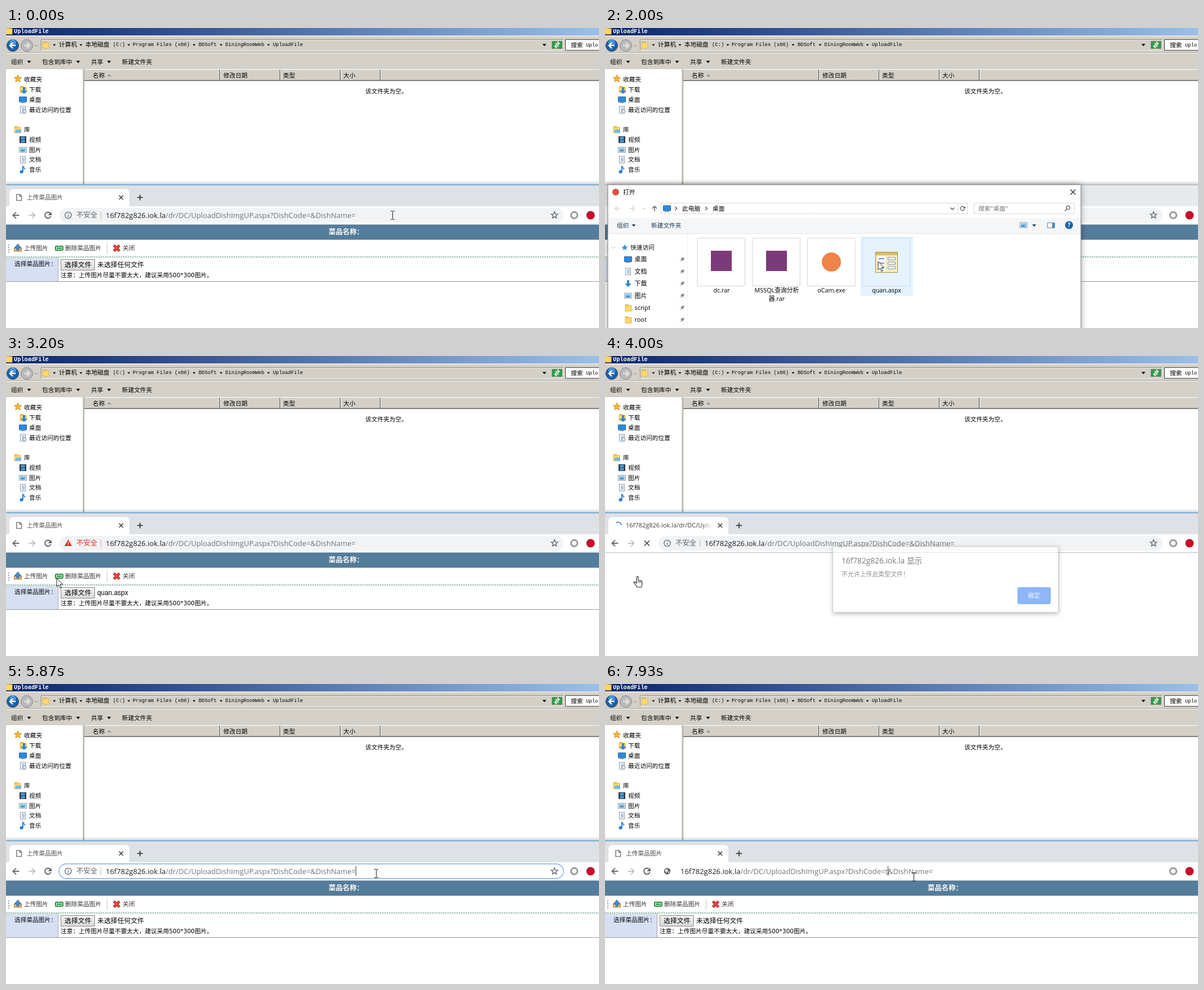
An HTML page with a canvas that plays this animation: 1053x532 px, repeating every 8000 ms.

```html
<!DOCTYPE html>
<html lang="zh-CN">
<head>
<meta charset="utf-8">
<title>上传菜品图片</title>
<style>
html, body { margin: 0; width: 100%; height: 100%; overflow: hidden; background: #fff; }
canvas { display: block; }
</style>
</head>
<body>
<canvas id="stage" width="1053" height="532"></canvas>
<script>
const ctx = document.getElementById('stage').getContext('2d');
const LOOP = 8000, W = 1053, H = 532;
const CJK = '"Noto Sans CJK SC", "Noto Sans CJK", sans-serif';
const UI = '"Open Sans", ' + CJK;
const MONO = '"Liberation Mono", monospace';
const HOST = '16f782g826.iok.la', PATH = '/dr/DC/UploadDishImgUP.aspx?DishCode=', TAIL = '&DishName=';
const GREY = '#5f6368';

// Drawing helpers
function paint(fill, stroke, lw = 1) {
  if (fill) { ctx.fillStyle = fill; ctx.fill(); }
  if (stroke) { ctx.strokeStyle = stroke; ctx.lineWidth = lw; ctx.stroke(); }
}
function box(x, y, w, h, fill, stroke, r = 0, lw = 1) {
  ctx.beginPath();
  ctx.roundRect(x, y, w, h, r);
  paint(fill, stroke, lw);
}
// White panel whose shadow falls only outside it, so it can fade cleanly
function panel(x, y, w, h, color, blur, drop = 0) {
  ctx.save();
  ctx.beginPath();
  ctx.rect(-W, -H, 3 * W, 3 * H);
  ctx.rect(x, y, w, h);
  ctx.clip('evenodd');
  ctx.shadowColor = color;
  ctx.shadowBlur = blur;
  ctx.shadowOffsetY = drop;
  box(x, y, w, h, '#fff');
  ctx.restore();
  box(x, y, w, h, '#fff');
}
function disc(x, y, r, fill, stroke, lw) {
  ctx.beginPath();
  ctx.arc(x, y, r, 0, 7);
  paint(fill, stroke, lw);
}
function shape(pts, fill, stroke, lw, close = true) {
  ctx.beginPath();
  for (let i = 0; i < pts.length; i += 2) ctx.lineTo(pts[i], pts[i + 1]);
  if (close) ctx.closePath();
  paint(fill, stroke, lw);
}
const line = (pts, color, lw = 1) => shape(pts, null, color, lw, false);
function text(s, x, cy, size = 10.7, color = '#000', font = CJK, weight = 400) {
  ctx.font = `${weight} ${size}px ${font}`;
  ctx.fillStyle = color;
  ctx.fillText(s, x, cy + size * 0.36);
  return x + ctx.measureText(s).width;
}
const down = (x, y, s = 3.5, color = '#000') => shape([x - s, y - s / 2, x + s, y - s / 2, x, y + s / 2 + .5], color);
function cross(x, y, s, color, lw) {
  line([x - s, y - s, x + s, y + s], color, lw);
  line([x + s, y - s, x - s, y + s], color, lw);
}
function arrow(x, y, s, dir, color, lw = 1.7) {
  line([x - dir * s, y, x + dir * s, y], color, lw);
  line([x, y - s, x + dir * s, y, x, y + s], color, lw);
}
function star(x, y, r, fill, stroke, lw) {
  const pts = [];
  for (let i = 0; i < 10; i++) {
    const a = i * Math.PI / 5 - Math.PI / 2, k = i % 2 ? r * .42 : r;
    pts.push(x + k * Math.cos(a), y + k * Math.sin(a));
  }
  shape(pts, fill, stroke, lw);
}
function reload(x, y, r, color, lw) {
  ctx.beginPath();
  ctx.arc(x, y, r, .3, 5.6);
  paint(null, color, lw);
  shape([x + r + 1, y - r, x + r + 1, y, x, y], color);
}

// Small icons, centred on x, y
const icons = {
  folder(x, y) { box(x - 5, y - 6, 6, 5, '#e6b93c'); box(x - 5, y - 4, 11, 10, '#fbd86b', '#e3b64a'); },
  screen(x, y) { box(x - 6.5, y - 5, 13, 9, '#2b8be0', '#2860a0'); box(x - 4, y + 5, 8, 1, '#777'); },
  page(x, y) {
    box(x - 4.5, y - 6, 9, 12, '#fff', '#7f95aa');
    for (let i = -3; i < 5; i += 2) line([x - 2, y + i, x + 3, y + i], '#6f9ac4');
  },
  photo(x, y) {
    box(x - 6.5, y - 4.5, 13, 9, '#fff', '#8496a8');
    box(x - 5, y - 3, 10, 6, '#7fc0ee');
    shape([x - 5, y + 3, x - 1, y, x + 5, y + 3], '#3b7fa8');
  },
  film(x, y) {
    box(x - 6, y - 6, 12, 12, '#263b52');
    box(x - 3.5, y - 5, 7, 10, '#4a9ad0');
    line([x - 4, y, x + 4, y], '#263b52');
  },
  note(x, y) {
    line([x, y + 4, x, y - 6, x + 4, y - 1], '#2b82d8', 2);
    disc(x - 2.5, y + 3.5, 3, '#2b82d8');
  },
  get(x, y) { shape([x - 2, y - 6, x + 2, y - 6, x + 2, y, x + 6, y, x, y + 6, x - 6, y, x - 2, y], '#2f86d2'); },
  saved(x, y) { icons.folder(x, y); icons.get(x + 2, y + 2); },
  recent(x, y) { icons.page(x, y); disc(x + 3, y + 3, 3, '#e8eef4', '#7890a8'); }
};

function explorer() {
  box(0, 0, W, 279, '#fff');
  box(0, 13, W, 60, '#d4d0c8');
  const bar = ctx.createLinearGradient(0, 0, W, 0);
  bar.addColorStop(0, '#0a246a');
  bar.addColorStop(1, '#9cbfea');
  box(0, 0, W, 13, bar);
  icons.folder(5, 5);
  text('UploadFile', 14, 5.5, 10.3, '#fff', MONO, 700);

  box(0, 14, W, 1, '#f4f2ee');
  disc(12, 31, 10.5, '#1c5fae', '#31475f');
  disc(12, 26, 6, '#4b93d6');
  arrow(12, 31, 5, -1, '#fff', 2.4);
  disc(37, 31, 10.5, '#b9b9b9', '#888');
  arrow(37, 31, 5, 1, '#e4e4e4', 2.4);
  line([51, 30, 53.5, 32.5, 56, 30], '#888');
  box(62.5, 20.5, 927, 19, null, '#8a867e');
  box(63.5, 21.5, 926, 18, null, '#eeece6');
  icons.folder(70, 30);
  for (const x of [86, 133, 218, 334, 382, 466]) down(x, 30, 2.5);
  text('计算机', 94, 29.5);
  text('本地磁盘', 141, 29.5);
  for (const [s, x] of [['(C:)', 190], ['Program Files (x86)', 225], ['BDSoft', 342], ['DiningRoomWeb', 389.5], ['UploadFile', 474]])
    text(s, x, 29, 8.9, '#000', MONO);
  down(956, 30);
  box(969.5, 23.5, 18, 13, '#2f9a46', '#71906f');
  arrow(979, 27.5, 3.5, 1, '#fff', 1.6);
  arrow(978, 32.5, 3.5, -1, '#fff', 1.6);
  box(993.5, 20.5, 70, 19, '#fff', '#45433f');
  text('搜索', 1003, 30);
  text('Uplo', 1030, 30, 8.9, '#000', MONO);
  box(0, 43, W, 1, '#a5a198');
  box(0, 44, W, 1, '#fff');

  for (const [s, x, tip] of [['组织', 9, 41], ['包含到库中', 64, 128], ['共享', 151, 183], ['新建文件夹', 206, 0]]) {
    text(s, x, 60);
    if (tip) down(tip, 60);
  }

  box(136, 73, 3, 206, '#d4d0c8');
  box(138, 73, 1, 206, '#a09c94');
  box(139, 74, W, 19, '#d4d0c8');
  box(139, 92.5, W, 1.2, '#47453f');
  for (const x of [380, 487, 594, 665]) { box(x - 1, 74, 1, 19, '#45433f'); box(x, 74, 1, 18, '#fff'); }
  for (const [s, x] of [['名称', 154], ['修改日期', 386], ['类型', 492], ['大小', 599]]) text(s, x, 84);
  shape([180, 85.5, 187, 85.5, 183.5, 82], '#888');
  text('该文件夹为空。', 638, 112);

  star(21, 90, 7, '#f7b731', '#d98b18');
  text('收藏夹', 32, 91);
  icons.folder(20, 180);
  box(17, 180, 10, 6, '#7db9e4');
  text('库', 32, 180);
  for (const [s, y, icon] of [['下载', 109, 'saved'], ['桌面', 127, 'screen'], ['最近访问的位置', 145, 'recent'],
    ['视频', 198, 'film'], ['图片', 216, 'photo'], ['文档', 233.5, 'page'], ['音乐', 251.5, 'note']]) {
    icons[icon](30, y);
    text(s, 41, y);
  }
}

function omnibox(t) {
  const focus = t >= 5840 && t < 7900, typed = t >= 7900;
  const red = t >= 1300 && t < 3400, selected = t >= 5930 && t < 6250;
  if (!typed) box(95, 319, 895, 26, focus ? '#fff' : '#f1f3f4', null, 13);
  if (focus) box(94, 319, 896, 26, null, '#9dbff5', 13, 1.8);
  const start = typed ? 134 : 177;
  if (typed) {
    disc(110.5, 332, 5.8, GREY);
    shape([106, 330, 110, 328, 112, 331, 109, 335], '#fff');
    shape([112, 333, 115, 332, 113, 336], '#fff');
  } else {
    if (red) {
      shape([110.5, 325.5, 117, 337, 104, 337], '#d93025');
      box(110, 329.5, 1.2, 4, '#fff');
      box(110, 334.5, 1.2, 1.2, '#fff');
    } else {
      disc(110.5, 332, 5.6, null, GREY, 1.3);
      box(110, 331, 1.3, 4, GREY);
      box(110, 328.5, 1.3, 1.3, GREY);
    }
    text('不安全', 125, 332, 12.4, red ? '#d93025' : GREY);
    box(168, 325, 1, 14, red ? '#e0a8a4' : '#b5b8bc');
    star(974, 332, 6.3, null, GREY, 1.3);
  }
  if (selected) box(177, 323, 446, 17, '#0078d7');
  const dark = selected ? '#fff' : '#202124', pale = selected ? '#fff' : '#70757a';
  const x = text(HOST, start, 332, 13, dark, UI);
  const caret = text(PATH + (typed ? 't' : ''), x, 332, 13, pale, UI);
  const end = text(TAIL, caret, 332, 13, pale, UI);
  const blink = (t >= 6250 && t < 6715) || (t >= 7190 && t < 7715) || typed;
  if (focus && t < 5930) box(end, 323, 1, 17, '#333');
  else if (blink) box(caret, 323, 1, 17, '#333');
}

function browser(t) {
  const inactive = t >= 1400 && t < 2500, loading = t >= 3400 && t < 4800;
  const glow = ctx.createLinearGradient(0, 271, 0, 278);
  glow.addColorStop(0, '#0000');
  glow.addColorStop(1, '#0003');
  box(0, 271, W, 7, glow);
  box(0, 278, W, H, '#fff');
  box(0, 277.5, W, 38.5, inactive ? '#e7eaed' : '#dee1e6');
  box(0, 277.5, W, 1.3, inactive ? '#a8abb0' : '#3f94d1');
  box(6, 285.5, 213, 36, '#fff', null, 7);
  box(0, 316, W, 33, '#fff');
  if (loading) {
    const a = (t - 4000) / 160;
    ctx.beginPath();
    ctx.arc(23, 300.5, 6, a - 2.2, a - .1);
    paint(null, '#5f86c8', 1.8);
    ctx.save();
    ctx.beginPath();
    ctx.rect(37, 290, 155, 22);
    ctx.clip();
    const fade = ctx.createLinearGradient(170, 0, 192, 0);
    fade.addColorStop(0, '#3c4043');
    fade.addColorStop(1, '#3c404300');
    text(HOST + '/dr/DC/UploadDish', 37, 300.5, 11, fade, UI);
    ctx.restore();
    cross(74.5, 332, 4.6, '#505357', 1.7);
  } else {
    shape([19, 295, 24.5, 295, 27.5, 298, 27.5, 306, 19, 306], '#fff', '#505357', 1.2);
    line([24, 295, 24, 298.5, 27.5, 298.5], '#505357');
    text('上传菜品图片', 37, 300.5, 10.7, '#45494d');
    reload(74.5, 332, 5.3, '#505357', 1.7);
  }
  cross(204.5, 300.5, 3.6, '#45494d', 1.5);
  line([233, 300.5, 243, 300.5], '#333', 1.7);
  line([238, 295.5, 238, 305.5], '#333', 1.7);
  arrow(18, 332, 5.5, -1, '#505357');
  arrow(46, 332, 5.5, 1, '#b8babd');
  omnibox(t);
  disc(1009, 332, 5.7, null, '#9a9a9a', 3);
  disc(1038, 332, 7.5, '#c70d2c');
  if (t >= 3640 && t < 4800) box(0, 348, W, 1, '#b9bbbe');
  else page(t);
}

function page(t) {
  box(0, 348.5, W, 27, '#547c9b');
  text('菜品名称：', 573, 362, 12.4, '#fff', CJK, 700);
  for (let y = 384; y < 398; y += 4) box(4, y, 2, 2, '#999');
  box(14.5, 390, 13, 6, '#e8b878', '#a37c4c');
  shape([21, 383, 27, 390, 23, 390, 23, 394, 19, 394, 19, 390, 15, 390], '#4a90c8', '#2f6797');
  text('上传图片', 32, 390.5, 10.7, '#333');
  box(88, 387, 13, 7, '#fff', '#268a3d', 1, 2);
  box(90, 389, 9, 3, '#2eaa4c');
  text('删除菜品图片', 105, 390.5, 10.7, '#333');
  box(179, 381, 1, 20, '#c8c8c8');
  cross(196.5, 390.5, 5, '#a8201a', 4.6);
  cross(196.5, 390.5, 5, '#e04a3f', 3);
  text('关闭', 207, 390.5, 10.7, '#333');
  for (let x = 0; x < W; x += 4) box(x, 405.5, 2.6, 1, '#2e7d46');

  box(0, 407, 92, 42, '#d7e0f3');
  box(92, 407, 1, 42, '#a0a4aa');
  box(0, 449, W, 1, '#999');
  text('选择菜品图片：', 15, 418);
  const face = ctx.createLinearGradient(0, 410, 0, 430);
  face.addColorStop(0, '#f2f2f2');
  face.addColorStop(1, '#d9d9d9');
  box(97.5, 410.5, 60, 19, face, '#8a8a8a');
  text('选择文件', 104, 420, 11.9);
  if (t >= 2480 && t < 3640) text('quan.aspx', 162, 420, 11.9, '#000', '"Liberation Sans", sans-serif');
  else text('未选择任何文件', 162, 420, 11.9);
  let x = text('注意：上传图片尽量不要太大，建议采用', 97, 438.5);
  x = text('500*300', x, 438.5, 10.6, '#000', '"DejaVu Sans", sans-serif');
  text('图片。', x, 438.5);
}

function fileDialog(t, alpha, scale, pos) {
  const closing = t >= 2520;
  ctx.save();
  ctx.translate(425, 500);
  ctx.scale(scale, scale);
  ctx.translate(-425, -500);
  ctx.globalAlpha = alpha ** 2;
  panel(5, 278, 840, 480, '#0006', 11);
  box(5.5, 337, 839, 27, '#f5f6f7');
  ctx.globalAlpha = alpha;
  box(5, 278, 840, 480, null, '#85888c');
  if (!closing) {
    disc(19, 291, 6, '#dd5144');
    cross(831, 291, 4.5, '#222', 1.2);
  }
  text('打开', closing ? 14 : 32, 291.5);

  arrow(22, 320, 4.5, -1, '#d0d0d0', 1.3);
  arrow(48, 320, 4.5, 1, '#d0d0d0', 1.3);
  line([67, 319, 69.5, 321.5, 72, 319], '#bbb');
  line([88, 325, 88, 316], '#555', 1.4);
  line([84, 320, 88, 316, 92, 320], '#555', 1.4);
  box(99.5, 310.5, 544, 19, null, '#d9d9d9');
  box(626, 311, 1, 18, '#d9d9d9');
  icons.screen(110, 320);
  for (const x of [126, 180]) line([x - 1.5, 317, x + 1.5, 320, x - 1.5, 323], '#444', 1.2);
  text('此电脑', 137, 320);
  text('桌面', 191, 320);
  line([613.5, 318.5, 617, 322, 620.5, 318.5], '#555', 1.3);
  reload(635, 320, 3.7, '#555', 1.2);
  box(655.5, 310.5, 178, 19, null, '#d9d9d9');
  text('搜索"桌面"', 663, 320, 10.7, '#757575');
  disc(822.5, 318.5, 3.2, null, '#555', 1.2);
  line([820, 321, 816.5, 324.5], '#555', 1.5);

  text('组织', 21, 350.5, 10.7, '#1e395b');
  down(51, 350, 3.5, '#1e395b');
  text('新建文件夹', 82, 350.5, 10.7, '#1e395b');
  icons.photo(743, 349.5);
  down(762, 350, 3.5, '#1e395b');
  box(785.5, 345.5, 13, 9, '#fff', '#5d83a8');
  box(794, 346, 4, 8, '#4a8cc8');
  disc(824, 349.5, 7, '#0f62ad');
  text('?', 821.5, 349.5, 10, '#fff', UI, 700);
  box(6, 364, 838, 1, '#e3e5e8');

  line([12, 388, 15, 391, 18, 388], '#bbb');
  star(35, 389.5, 6, '#2f8fd8');
  text('快速访问', 45, 389.5);
  [['桌面', 'screen'], ['文档', 'page'], ['下载', 'get'], ['图片', 'photo'], ['script', 'folder'], ['root', 'folder']]
    .forEach(([s, icon], i) => {
      const y = 410.5 + i * 21.4;
      icons[icon](41, y);
      text(s, 52.5, y, 10.9, '#000', UI);
      line([133, y + 4, 136, y + 1], '#777');
      shape([134, y - 1, 138, y + 3, 141, y - 2, 139, y - 4], '#8a8a8a');
    });
  box(146, 365, 1, 170, '#f0f0f0');

  const picked = t >= 2280, over = pos.x > 454 && pos.x < 547 && pos.y > 370 && pos.y < 475;
  if (picked) box(454.5, 370.5, 92, 104, '#cce8ff', '#99d1ff');
  else if (over) box(454, 370, 93, 105, '#e5f3ff');
  for (let i = 0; i < 4; i++) box(164 + i * 97.8, 372.5, 84.5, 85, null, i < 3 ? '#d5d5d5' : '#c4dcee');
  for (const x of [188, 286]) box(x, 395, 37, 36, '#7b3b78');
  disc(402, 415, 17, '#ee8447');
  box(480.5, 397.5, 39, 36, '#f6ecc0', '#a28e50');
  box(481, 398, 38, 5, '#d9bd62');
  box(484, 405, 14, 26, '#fff');
  for (let y = 408; y < 430; y += 8) {
    line([486, y + 1, 496, y + 1], '#4979b5', 1.6);
    box(502.5, y - 1, 13, 4, '#fff', '#6f8fb5');
  }
  ctx.textAlign = 'center';
  for (const [s, x, y] of [['dc.rar', 207, 465], ['MSSQL查询分析', 305, 465], ['器.rar', 305, 480], ['oCam.exe', 402, 465], ['quan.aspx', 500, 465]])
    text(s, x, y, 10.8, '#000', UI);
  ctx.restore();
}

function alertBox(alpha) {
  ctx.save();
  ctx.globalAlpha = alpha;
  panel(404.5, 338, 400.5, 116.5, '#0007', 8, 2);
  box(404.5, 338, 400.5, 116.5, null, '#b5b5b5', 2);
  const x = text(HOST, 420, 363, 13.7, '#202124', UI);
  text('显示', x + 4, 363, 13.6, '#202124');
  text('不允许上传此类型文件！', 420, 387.5, 10.9, '#444');
  box(733, 410.5, 58, 29, '#4285f4', '#6fa8f8', 3, 1.5);
  text('确定', 751, 425.5, 10.8, '#fff', CJK, 700);
  ctx.restore();
}

// Pointer path: time, x, y
const path = [
  [0, 686, 332], [330, 686, 332], [530, 600, 430], [670, 600, 430], [1270, 135, 418], [1600, 135, 418],
  [1960, 485, 414], [2330, 485, 414], [2600, 498, 429], [2720, 498, 429], [3300, 56, 391], [4070, 56, 391],
  [4450, 760, 422], [4900, 760, 422], [5330, 757, 432], [5850, 657, 336], [5930, 657, 336], [6070, 541, 331],
  [6270, 541, 331], [6530, 557, 331], [6700, 557, 331], [7000, 544, 340], [7200, 548, 342], [LOOP, 548, 342]
];
const ramp = (t, a, b) => Math.min(1, Math.max(0, (t - a) / (b - a)));
function pointer(t) {
  const i = path.findIndex(k => k[0] > t), [t0, x0, y0] = path[i - 1], [t1, x1, y1] = path[i];
  const p = ramp(t, t0, t1), e = p * p * (3 - 2 * p);
  return { x: x0 + (x1 - x0) * e, y: y0 + (y1 - y0) * e };
}
function drawPointer(t, { x, y }) {
  ctx.save();
  ctx.translate(Math.round(x), Math.round(y));
  if (y > 318 && y < 346 && x > 95 && x < 990) {
    box(0, -7, 1, 14, '#222');
    for (const v of [-7.5, 7.5]) { box(-3, v - .5, 3, 1, '#222'); box(1, v - .5, 3, 1, '#222'); }
  } else if (t >= 3250 && t < 4090) {
    shape([0, 1, 2, 0, 3, 1, 3, 7, 6, 7, 9, 8, 10, 10, 10, 14, 8, 19, 1, 19, -3, 13, -5, 11, -4, 9.5, -2, 10, 0, 12], '#fff', '#222', 1.1);
    for (const v of [3, 5.5, 8]) line([v, 8, v, 11.5], '#222', .8);
  } else {
    shape([0, 0, 0, 15, 3.5, 12, 6, 17.5, 8.5, 16.5, 6, 11, 10.5, 11], '#fff', '#222', 1);
  }
  ctx.restore();
}

function draw() {
  const t = performance.now() % LOOP, pos = pointer(t);
  explorer();
  browser(t);
  if (t >= 1510 && t < 2670) {
    const opened = ramp(t, 1510, 1730), closed = ramp(t, 2520, 2670);
    fileDialog(t, opened * (1 - closed), 1 - .05 * (1 - opened) ** 2 - .05 * closed, pos);
  }
  if (t >= 3870 && t < 4680) alertBox(ramp(t, 3870, 4090) * (1 - ramp(t, 4530, 4680)));
  drawPointer(t, pos);
  requestAnimationFrame(draw);
}
draw();
</script>
</body>
</html>
```
